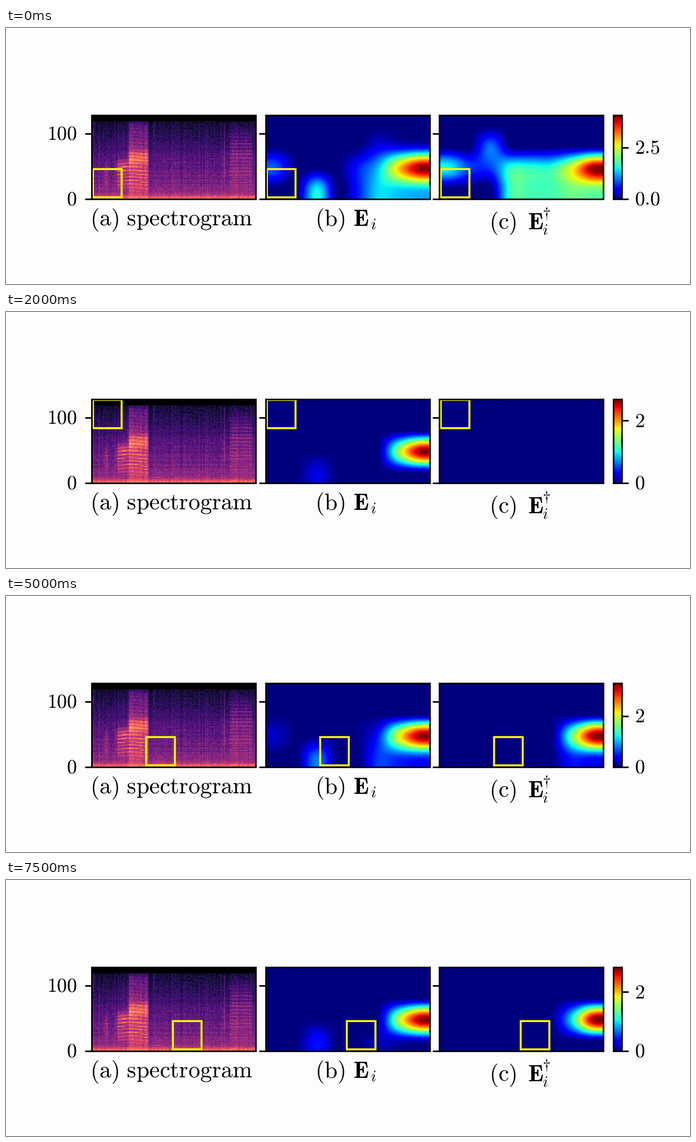
A matplotlib script for the animation above (8000 ms loop, 1222x458 px).

```python
import numpy as np
import matplotlib.pyplot as plt
from matplotlib.animation import FuncAnimation
from matplotlib.patches import Rectangle

W, H, DPI = 1222, 458, 100
PX = 72 / DPI                      # points per pixel
LEFT, TOP, WIDTH, HEIGHT = 153.05, 156.4, 292.9, 149.7
PITCH = 310.7                      # distance between panels
BOTTOM = TOP + HEIGHT
BAR_X, BAR_W = 1085.3, 14.5
LINE, TICK = 2.8, 12.2
STEPS, ROWS_PER_COL = 16, 5

# Colour scale and the peak of map (c), eased between a few window positions
KEYS = (0, 2, 4, 6, 8, 11, 15)
SCALE = np.interp(range(STEPS), KEYS, (4.06, 3.15, 2.68, 1.13, 2.82, 3.5, 2.83))
PEAK_C = np.interp(range(STEPS), KEYS, (3.98, 3.07, 0, 1.06, 2.75, 3.42, 2.76))
FULL = 4.0

# Runs of cells on a 4 x 8 grid: row, first column, last column, strength at
# full peak, and how fast that strength fades as the peak drops
RUNS_B = [(2, 7, 7, 4.0, 1), (2, 6, 6, 2.85, 1), (2, 5, 5, 1.3, 1),
          (2, 4, 4, .6, .7), (3, 4, 4, .6, .9), (3, 5, 7, 1.4, 1),
          (3, 2, 2, 1.5, .9), (2, 0, 0, .85, .8), (1, 5, 7, .4, 1)]
RUNS_C = [(2, 7, 7, 4.0, 1), (2, 6, 6, 2.6, 1.25), (3, 6, 7, 2.05, 1.9),
          (2, 4, 5, 1.7, 2.5), (3, 3, 5, 1.8, 2.8), (2, 3, 3, 1.7, 2.2),
          (2, 0, 0, 1.55, 2), (1, 2, 2, 1.0, 2), (2, 1, 2, .8, 2)]


def cubic_weights(n_out, n_in):
    """Catmull-Rom resampling matrix with clamped edges."""
    pos = (np.arange(n_out) + .5) / n_out * n_in - .5
    base = np.floor(pos).astype(int)
    m = np.zeros((n_out, n_in))
    for k in range(-1, 3):
        d = np.abs(pos - base - k)
        w = np.where(d < 1, 1.5 * d**3 - 2.5 * d**2 + 1,
                     -.5 * d**3 + 2.5 * d**2 - 4 * d + 2)
        np.add.at(m, (np.arange(n_out), np.clip(base + k, 0, n_in - 1)), w)
    return m


UP_Y, UP_X = cubic_weights(150, 4), cubic_weights(294, 8)


def heat(runs, peak):
    grid = np.zeros((4, 8))
    for row, first, last, strength, fade in runs:
        grid[row, first:last + 1] = max(0, strength - fade * (FULL - peak))
    return UP_Y @ grid @ UP_X.T


def spectrogram():
    rng = np.random.default_rng(4)
    nx, ny = 250, 128
    x, y = np.meshgrid((np.arange(nx) + .5) * WIDTH / nx,
                       (np.arange(ny) + .5) * HEIGHT / ny)

    def edge(v, s):
        return 1 / (1 + np.exp(-np.clip(v / s, -40, 40)))

    def window(x0, x1, y0, y1, sx=.6, sy=4):
        return (edge(x - x0, sx) * edge(x1 - x, sx)
                * edge(y - y0, sy) * edge(y1 - y, sy))

    def bump(v, mid, width):
        return np.exp(-((v - mid) / width) ** 2)

    s = np.interp(y, [10, 14, 40, 80, 120, 139, 143, 147, 150],
                  [.08, .10, .16, .27, .35, .42, .52, .68, .74])
    s += rng.normal(0, .025, (1, nx)) + rng.normal(0, .04, (ny, nx))
    s += rng.normal(0, .025, (ny, 1)) * (y > 60)

    # Harmonics: slightly bent stripes of uneven strength
    bend = 3 * bump(x, 70, 20)
    stripes = .5 + .5 * np.sin(2 * np.pi * (y + bend) / 6.2)
    wave = stripes * rng.uniform(.3, 1.1, (ny, 1))
    s += window(66, 101, 12, 142, sy=5) * (
        .16 + .07 * wave + bump(y, 77, 14) * (.22 + .12 * wave)
        + .2 * wave * bump(y, 112, 20))
    s += window(45, 66, 80, 131, 1.5, 3) * (
        .08 + .28 * wave + .1 * bump(y, 88, 8))
    s += window(50, 68, 30, 80, 5, 12) * .06
    s += window(23, 29, 84, 129, 1, 4) * (.06 + .16 * wave)
    s += window(247, 286, 22, 135, 1, 6) * (.04 + .2 * wave * bump(y, 78, 45))
    s += window(235, 239, 62, 115, .8, 5) * .12
    for x0, y1 in ((110, 45), (236, 60), (3, 40)):
        s += window(x0, x0 + 2, 8, y1, .4, 5) * .1
    return np.where(y < 10.5, 0, np.clip(s, 0, .88))


plt.rcParams.update({"mathtext.fontset": "cm", "text.hinting": "none"})
fig = plt.figure(figsize=(W / DPI, H / DPI), dpi=DPI, facecolor="#fdfdfd")
ax = fig.add_axes([0, 0, 1, 1])
ax.axis("off")


def label(x, y, tex, em, ha="left"):
    return ax.text(x, y, f"${tex}$", fontsize=em * PX, ha=ha, va="baseline",
                   color="black", zorder=6)


def image(x, width, data, cmap):
    return ax.imshow(data, cmap=cmap, vmin=0, vmax=1, aspect="auto",
                     interpolation="nearest", zorder=1,
                     extent=(x, x + width, BOTTOM, TOP))


def outline(x, width, height, color, line, z):
    return ax.add_patch(Rectangle((x, TOP), width, height, fill=False,
                                  ec=color, lw=line * PX, zorder=z))


def tick(x, y):
    return ax.plot([x, x + TICK], [y, y], color="black", lw=LINE * PX,
                   solid_capstyle="butt", zorder=4)[0]


panels = [LEFT + PITCH * k for k in range(3)]
image(panels[0], WIDTH, spectrogram(), "magma")
maps = [image(x, WIDTH, np.zeros((150, 294)), "jet") for x in panels[1:]]
image(BAR_X, BAR_W, np.linspace(1, 0, 256)[:, None], "jet")

windows = []
for px in panels:
    outline(px, WIDTH, HEIGHT, "black", LINE, 5)
    for value in (0, 100):
        tick(px - TICK, BOTTOM - .6 - value * HEIGHT / 128)
    win = outline(px, 51.2, 50.6, "#ffff00", 3.5, 3)
    win.set_snap(False)
    windows.append(win)
outline(BAR_X, BAR_W, HEIGHT, "black", LINE, 5)

SMALL, BIG, SUB = 35.6, 41.9, 28.3
label(126.6, 200, "100", SMALL, "right")
label(126.6, 317.3, "0", SMALL, "right")
label(149.8, 354, r"\mathrm{(a)\ spectrogram}", BIG)
for x, y, name in ((551.5, 354, "b"), (863, 360, "c")):
    label(x, y, rf"\mathrm{{({name})}}", BIG)
    label(x + 69, y, r"\mathbf{E}", BIG)
label(651, 360.3, "i", SUB)
label(958, 371, "i", SUB)
label(958.5, 341, r"\dagger", SUB)

bar_end = BAR_X + BAR_W
tick(bar_end, BOTTOM)
bar_tick = tick(bar_end, TOP)
zero = label(1122.8, BOTTOM + 11.5, "0", SMALL)
upper = label(1122.8, TOP, "2", SMALL)

ax.set_xlim(0, W)
ax.set_ylim(H, 0)


def update(i):
    col, row = divmod(i, ROWS_PER_COL)
    for px, win in zip(panels, windows):
        win.set_xy((px + 2.3 + 47.6 * col, 252.4 - 23.8 * row))

    vmax = SCALE[i]
    for im, runs, peak in zip(maps, (RUNS_B, RUNS_C), (vmax - .08, PEAK_C[i])):
        im.set_data(heat(runs, peak))
        im.set_clim(0, vmax)

    mark = 2.5 if vmax > 4 else 2 if vmax >= 2 else 1
    y = BOTTOM - HEIGHT * mark / vmax
    bar_tick.set_ydata([y, y])
    upper.set_y(y + 11.5)
    upper.set_text(f"${mark}$")
    zero.set_text("$0.0$" if mark == 2.5 else "$0$")
    return [*windows, *maps, bar_tick, upper, zero]


anim = FuncAnimation(fig, update, frames=STEPS, interval=500,
                     repeat=True, repeat_delay=0, blit=False)
plt.show()
```
